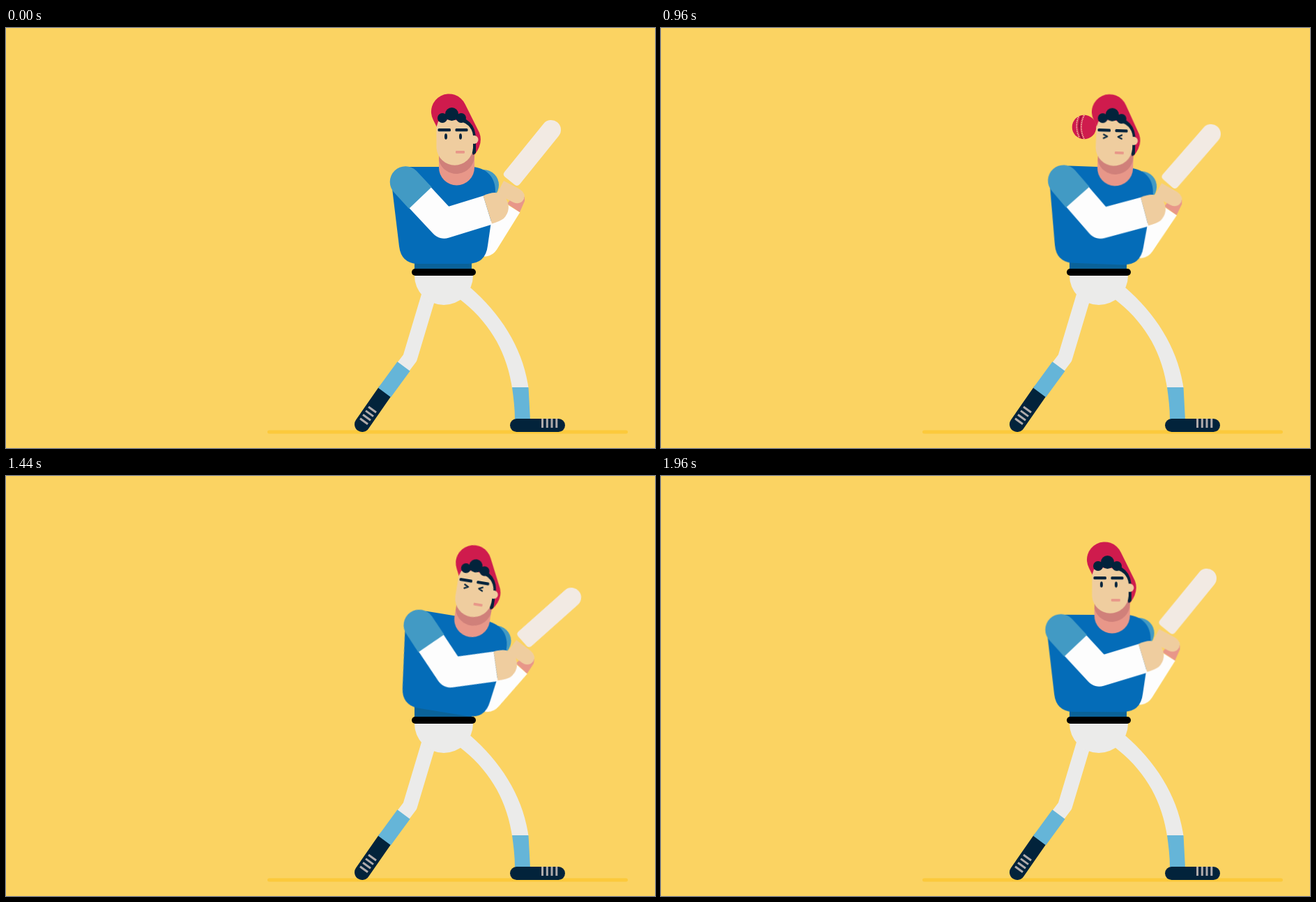
Animation of 931 by 602 pixels, one loop 2 s. Source, as an HTML page without scripts:

```html
<!DOCTYPE html>
<html lang="en">
<head>
<meta charset="utf-8">
<title>Batter</title>
<style>
  html, body { margin: 0; width: 100%; height: 100%; overflow: hidden; background: #fbd362; }
  svg { display: block; width: 100%; height: 100%; }

  .red { fill: #cf1b4d; }
  .navy { fill: #02233b; }
  .skin { fill: #efcd9f; }
  .pink { fill: #e89789; }
  .white { fill: #ebebea; }
  .blue { fill: #046cb8; }
  .sky { fill: #429ac4; }
  .line { fill: none; stroke-linejoin: round; }
  .sleeve { stroke: #fdfdfd; stroke-width: 43; }
  .lace { stroke: #b0abab; stroke-width: 3; }

  /* 2% of the loop is one 40 ms tick; the delay keeps steps off exact tick edges */
  .upper, .ball, .open, .shut { animation: 2s -5ms infinite step-end; }
  .upper { transform-origin: 624px 338px; animation-name: recoil; }
  .ball { animation-name: fly; }
  .open { animation-name: open; }
  .shut { animation-name: shut; }

  @keyframes recoil {
    0%, 46% { transform: rotate(0deg); }
    48% { transform: rotate(2.1deg); }
    50% { transform: rotate(9.2deg); }
    52% { transform: rotate(16.3deg); animation-timing-function: steps(23, end); }
    98% { transform: rotate(.27deg); }
    100% { transform: rotate(0deg); }
  }
  @keyframes fly {
    0% { transform: translate(-60px, 144px) rotate(-33deg); }
    28% { transform: translate(26px, 144px) rotate(-33deg); animation-timing-function: steps(9, end); }
    46% { transform: translate(558.5px, 148.2px) rotate(12deg); }
    48% { transform: translate(607px, 142px) rotate(90deg); animation-timing-function: steps(8, end); }
    64%, 100% { transform: translate(788px, -30px) rotate(610deg); }
  }
  @keyframes open {
    0%, 94%, 100% { opacity: 1; }
    48% { opacity: 0; }
  }
  @keyframes shut {
    0%, 94%, 100% { opacity: 0; }
    48% { opacity: 1; }
  }
</style>
</head>
<body>
<svg viewBox="0 0 931 602">
  <rect width="931" height="602" fill="#fbd362"/>
  <rect x="375" y="576.5" width="517" height="5" rx="2.5" fill="#fcc93b"/>

  <!-- left leg -->
  <path class="line" d="M608 378L579.5 473L570 485.5" stroke="#ebebea" stroke-width="21"/>
  <path class="line" d="M543 522L511 568" stroke="#02233b" stroke-width="22" stroke-linecap="round"/>
  <path class="line" d="M570.5 485L543 522.5" stroke="#65b5d8" stroke-width="22.5"/>
  <path class="lace" d="M520 543l11 8M516 548.6l11 8M512 554.2l11 8M508 559.8l11 8"/>

  <!-- right leg -->
  <path class="white" d="M666 372C710 410 742 460 749.500 516H726C718 462 692 420 650 388Z"/>
  <path d="M726 515H749.500L752 562H730C730 545 728 530 726 515Z" fill="#65b5d8"/>
  <rect class="navy" x="723" y="560" width="79" height="19" rx="9.5"/>
  <path class="lace" d="M769.500 560v13M776.300 560v13M783 560v13M789.800 560v13"/>

  <!-- hips -->
  <path class="white" d="M586 352H670V355A42 42 0 0 1 586 355Z"/>
  <rect x="586" y="320" width="82" height="27" fill="#0a6299"/>
  <rect x="582" y="345" width="92" height="10" rx="5"/>

  <g class="upper">
    <!-- bat and far arm -->
    <path transform="translate(782 146) rotate(-51)" fill="#f2eae3"
      d="M0-14A14 14 0 0 1 0 14H-89Q-94 14-94 9V-9Q-94-14-89-14Z"/>
    <path class="line sleeve" d="M719 253L686 306V240"/>
    <path class="pink" d="M744 242V248L737 264L719 252L728 240Z"/>
    <path class="skin" d="M714 219L737 231Q746 237 743 245Q738 254 728 250L704 238Z"/>
    <circle class="sky" cx="685" cy="225" r="22"/>

    <path class="blue" d="M575 199H668C690 200 703 215 702 236L691 312Q688 338 662 338H590Q567 337 564 313L553 222Z"/>

    <!-- neck and head -->
    <path class="pink" d="M621 165H672V200A25.500 25.500 0 0 1 621 200Z"/>
    <path d="M621 170H672V184A26 26 0 0 1 621 190Z" fill="#d0807a"/>
    <path class="red" d="M619 144L613 132A25.500 25.500 0 1 1 658.500 109L679 150Q685 165 672 182L660 150Z"/>
    <path class="navy" d="M640 125Q674 128 674 160V179L670 182L655 140Z"/>
    <path class="skin" d="M617.500 142L620 134Q632 130 645 132Q668 136 670 154V172A26.300 26.300 0 0 1 617.500 172Z"/>
    <circle class="skin" cx="671.500" cy="160" r="6"/>
    <g class="navy">
      <circle cx="626" cy="129" r="7"/>
      <circle cx="639.500" cy="123.500" r="9.500"/>
      <circle cx="653" cy="129" r="7"/>
      <rect x="619.500" y="144" width="18.500" height="4.200" rx="1.500"/>
      <rect x="644.500" y="144" width="18" height="4.200" rx="1.500"/>
      <g class="open">
        <ellipse cx="631" cy="155.500" rx="2" ry="4.300"/>
        <ellipse cx="652" cy="155.500" rx="2" ry="4.300"/>
      </g>
    </g>
    <path class="line shut" d="M627.500 152l6 3l-6 3M655 152l-6 3l6 3" stroke="#02233b" stroke-width="2"/>
    <rect class="pink" x="645" y="176" width="13" height="3.800" rx="1.200"/>

    <!-- near arm -->
    <path class="line sleeve" d="M592 241L628.500 280.200L691 261"/>
    <path class="sky" d="M610.500 228L578 259L557 236A22 22 0 0 1 589 205Z"/>
    <path class="skin" d="M684.500 240.500Q706 230 717 244Q726 260 714 273Q707 278 697 280.500Z"/>
  </g>

  <g class="ball">
    <circle class="red" r="17.300"/>
    <path class="line" d="M-16.500 4Q0 11 16.500 3" stroke="#7a1033" stroke-width="1.300"/>
    <path class="line" d="M-17 0Q0 8 17 0M-15 8Q0 14 15 7" stroke="#f0c9a8" stroke-width="1.600" stroke-dasharray="1.600 1"/>
  </g>
</svg>
</body>
</html>
```
